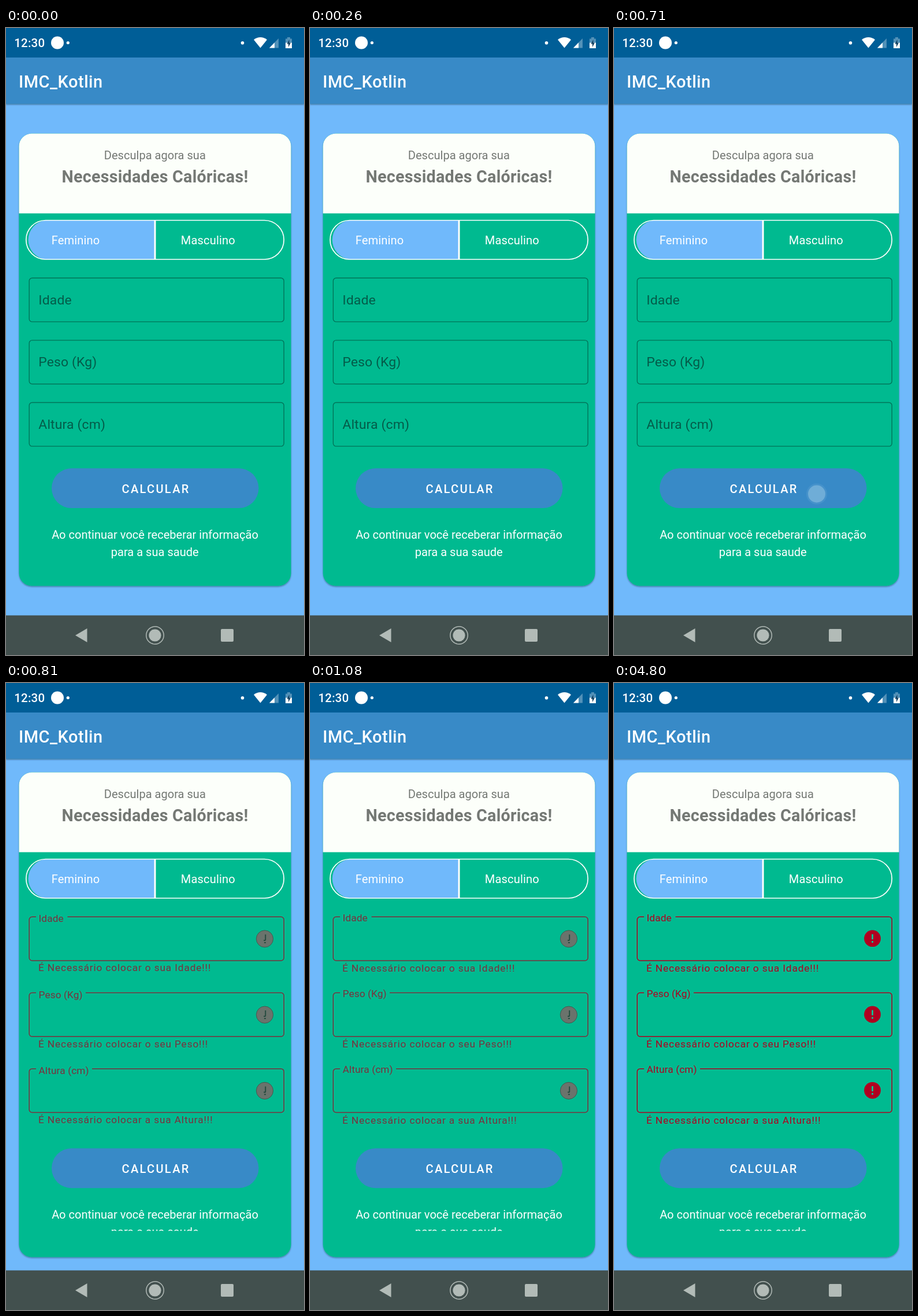
Recreate the animation shown at these times as an HTML page. Size 516 by 1084 pixels, loop 4960 ms.

```html
<!DOCTYPE html>
<html lang="pt">
<head>
<meta charset="utf-8">
<title>IMC_Kotlin</title>
<style>
  html, body { margin: 0; width: 100%; height: 100%; overflow: hidden; background: #70b9fb; }
  svg { display: block; width: 100%; height: 100%; font-family: Roboto, Arial, sans-serif; }
  text { white-space: pre; }
  .mid { text-anchor: middle; }
  .body { font-size: 20.07px; fill: #fff; }
  .hint { font-size: 22.93px; letter-spacing: .15px; fill: #045b49; }
  .label { font-size: 17.2px; letter-spacing: .15px; }
  .helper { font-size: 17.2px; letter-spacing: .9px; }
</style>
</head>
<body>
<svg viewBox="0 0 516 1084" preserveAspectRatio="none">
  <defs>
    <filter id="shadow" x="-5%" y="-5%" width="110%" height="110%">
      <feDropShadow dx="0" dy="1.6" stdDeviation="1.3" flood-color="#123" flood-opacity=".42"/>
    </filter>
    <clipPath id="noteClip"><rect x="0" y="0" width="516" height="947.3"/></clipPath>
  </defs>

  <rect width="516" height="1084" fill="#70b9fb"/>
  <rect y="51" width="516" height="80" fill="#378ac7" filter="url(#shadow)"/>
  <rect width="516" height="51" fill="#005e97"/>
  <text x="22" y="103" font-size="29" font-weight="500" letter-spacing=".5" fill="#fff">IMC_Kotlin</text>

  <g fill="#fff">
    <text x="14.2" y="33.4" font-size="20.5" font-weight="500" letter-spacing=".2">12:30</text>
    <circle cx="89" cy="25.5" r="11"/>
    <circle cx="107.3" cy="25.5" r="2.6"/>
    <circle cx="409.5" cy="25.7" r="2.8"/>
    <path d="M429 20.2Q440.5 12 452 20.2L440.5 34.5Z"/>
    <path d="M456 34.5L472 18V34.5Z" opacity=".32"/>
    <path d="M456 34.5L465 25.2V34.5Z"/>
    <path d="M484 18.5h3v-2.5h5v2.5h3V26h-11Z" opacity=".32"/>
    <path d="M484 25.5h11V35h-11Z"/>
    <path d="M490.5 20L486.5 27.5H489V33L493 25.5H490.5Z" fill="#123f60"/>
  </g>

  <rect id="card" x="22.5" width="471" rx="22" fill="#00ba90" filter="url(#shadow)"/>
  <g id="header">
    <path d="M22.5 320.5V204.5a22 22 0 0 1 22-22h427a22 22 0 0 1 22 22V320.5Z" fill="#fcfffa"/>
    <g class="mid" fill="#747874">
      <text x="257.8" y="227" font-size="20.07">Desculpa agora sua</text>
      <text x="258" y="266.7" font-size="28.67" font-weight="700" letter-spacing=".25">Necessidades Calóricas!</text>
    </g>
    <path d="M258 332.5H68.5a34 34 0 0 0 0 67.5H258Z" fill="#70b9fb"/>
    <rect x="34.8" y="332.5" width="446.4" height="67.5" rx="33.75" fill="none" stroke="#fff" stroke-width="1.7"/>
    <path d="M258 332V400" stroke="#fff" stroke-width="3"/>
    <g class="body" letter-spacing=".15">
      <text x="78.7" y="374.3">Feminino</text>
      <text x="302.8" y="374.3">Masculino</text>
    </g>
  </g>

  <g id="idle"></g>
  <g id="errors"></g>

  <g clip-path="url(#noteClip)">
    <g id="footer">
      <rect x="79" y="761.3" width="358.5" height="68.7" rx="34.3" fill="#388ac7"/>
      <text class="mid" x="259.6" y="803.7" font-size="20.07" font-weight="500" letter-spacing="2.3" fill="#fff">CALCULAR</text>
      <g class="body mid">
        <text x="258" y="882.8">Ao continuar você receberar informação</text>
        <text x="257.7" y="912.8">para a sua saude</text>
      </g>
    </g>
  </g>

  <g id="touch" fill="#b5d9ea">
    <circle cx="351" cy="805.5" r="18" opacity=".1"/>
    <circle cx="351" cy="805.5" r="15" opacity=".38"/>
  </g>

  <rect y="1015.5" width="516" height="69" fill="#42504e"/>
  <g fill="#b2bbb7">
    <path d="M120 1050L140.5 1038V1062Z"/>
    <circle cx="258" cy="1050" r="15.2" fill="none" stroke="#b2bbb7" stroke-width="1.5"/>
    <circle cx="258" cy="1050" r="10.6"/>
    <rect x="372" y="1039" width="22" height="22" rx="2"/>
  </g>
</svg>
<script>
const LOOP = 4960, PRESS = 710, FAIL = 810, SETTLED = 910, REDDEN = 3200;
const fields = [
  { name: 'Idade', notch: 106.5, error: 'É Necessário colocar o sua Idade!!!' },
  { name: 'Peso (Kg)', notch: 138, error: 'É Necessário colocar o seu Peso!!!' },
  { name: 'Altura (cm)', notch: 149, error: 'É Necessário colocar a sua Altura!!!' }
];
const $ = id => document.getElementById(id);
const show = (el, on) => el.setAttribute('display', on ? 'inline' : 'none');
const moveY = (el, y) => el.setAttribute('transform', `translate(0 ${y})`);

$('idle').innerHTML = fields.map((f, i) => `
  <g transform="translate(0 ${432.3 + i * 107.6})">
    <rect x="40.2" width="441" height="75.6" rx="5" fill="none" stroke="#027459" stroke-width="1.4"/>
    <text class="hint" x="56.3" y="45.3">${f.name}</text>
  </g>`).join('');

$('errors').innerHTML = fields.map((f, i) => `
  <g transform="translate(0 ${404.3 + i * 131.3})">
    <path d="M52 0H45.2a5 5 0 0 0-5 5V70.6a5 5 0 0 0 5 5H476.2a5 5 0 0 0 5-5V5a5 5 0 0 0-5-5H${f.notch}"
      fill="none" stroke="currentColor" stroke-width="1.5"/>
    <g class="floating"><text class="label" x="56.5" y="7.2" fill="currentColor">${f.name}</text></g>
    <g class="message"><text class="helper" x="56" y="94.9" fill="currentColor">${f.error}</text></g>
    <g class="dull">
      <circle cx="448" cy="38" r="14.6" fill="#6a736c" stroke="#40564c" stroke-width=".9"/>
      <path d="M449.3 30.5V39.5q0 2-3 .8M447 44.5h3" fill="none" stroke="#20483c" stroke-width="1.8"/>
    </g>
    <g class="bright">
      <circle cx="447.5" cy="37.4" r="14.4" fill="#b00020"/>
      <path d="M447.5 30V39M447.5 41.8V44.8" stroke="#00ba90" stroke-width="3"/>
    </g>
  </g>`).join('');

const all = name => document.querySelectorAll('.' + name);
const floating = all('floating'), messages = all('message'), dull = all('dull'), bright = all('bright');

function render(t) {
  const failed = t >= FAIL, red = t >= REDDEN, settling = t < SETTLED;
  const rise = failed ? 28 : 0;
  $('card').setAttribute('y', 182.5 - rise);
  $('card').setAttribute('height', 782 + 2 * rise);
  moveY($('header'), -rise);
  moveY($('footer'), failed ? 43.2 : 0);
  show($('idle'), !failed);
  show($('errors'), failed);
  show($('touch'), t >= PRESS && !failed);
  $('errors').setAttribute('color', red ? '#b00020' : '#7b303d');
  floating.forEach(el => moveY(el, settling ? 1.7 : 0));
  messages.forEach(el => moveY(el, settling ? -0.8 : 0));
  dull.forEach(el => show(el, !red));
  bright.forEach(el => show(el, red));
}

const start = performance.now();
function tick() {
  render((performance.now() - start) % LOOP);
  requestAnimationFrame(tick);
}
render(0);
requestAnimationFrame(tick);
</script>
</body>
</html>
```
